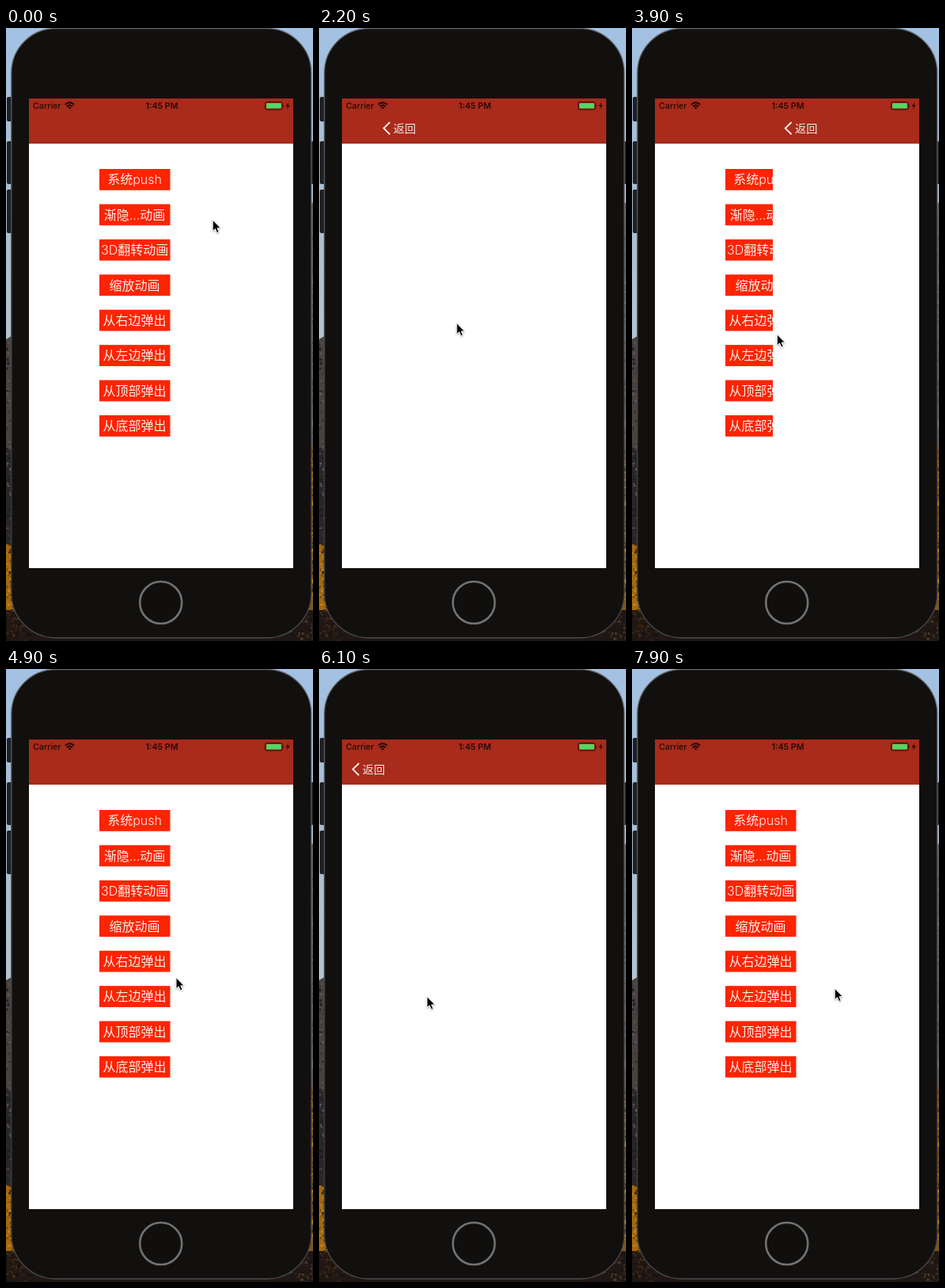
An HTML page that plays this animation: 388x774 px, repeating every 8000 ms.

```html
<!DOCTYPE html>
<html lang="zh-CN">
<head>
<meta charset="utf-8">
<title>转场动画</title>
<style>
  html, body { margin: 0; width: 100%; height: 100%; overflow: hidden; background: #131313; }
  svg { display: block; width: 388px; height: 774px; }
  text { font-family: Inter, "Noto Sans CJK SC", "Noto Sans CJK", sans-serif; }
  .label { font-size: 16px; font-weight: 300; fill: #fff; fill-opacity: .92; text-anchor: middle; }
  .status { font-size: 10.7px; font-weight: 600; fill: #260a07; }
  #cursor { filter: drop-shadow(0 1px 1px rgba(0, 0, 0, .3)); }
</style>
</head>
<body>
<svg viewBox="0 0 388 774">
  <defs>
    <linearGradient id="sky" x1="0" y1="0" x2="0" y2="1">
      <stop offset="0" stop-color="#a3c1e3"/>
      <stop offset=".5" stop-color="#a8bdd0"/>
      <stop offset="1" stop-color="#b4c3cd"/>
    </linearGradient>
    <linearGradient id="rim" x1="0" y1="0" x2="0" y2="1">
      <stop offset="0" stop-color="#64676b"/>
      <stop offset=".8" stop-color="#3c3d3f"/>
      <stop offset="1" stop-color="#4b4c4e"/>
    </linearGradient>
    <clipPath id="screen"><rect x="29" y="89" width="334" height="593"/></clipPath>
  </defs>

  <g id="wallpaper">
    <rect width="388" height="400" fill="url(#sky)"/>
    <path d="M0 393L7 389V774H0Z" fill="#48423f"/>
    <path d="M381 226L388 220V774H381Z" fill="#625e60"/>
    <rect y="530" width="8" height="122" fill="#292625"/>
    <rect x="381" y="528" width="7" height="246" fill="#7c561d"/>
    <rect y="652" width="60" height="122" fill="#a2670f"/>
    <rect y="735" width="388" height="39" fill="#1f1713"/>
  </g>

  <g fill="#1e2023">
    <rect x="1" y="87" width="9" height="31" rx="2"/>
    <rect x="1" y="143" width="9" height="54" rx="2"/>
    <rect x="1" y="204" width="9" height="55" rx="2"/>
    <rect x="383" y="143" width="6" height="54" rx="2"/>
  </g>
  <rect x="6.8" y=".5" width="379" height="769.5" rx="56" fill="#12100f" stroke="url(#rim)" stroke-width="1.3"/>
  <circle cx="195.7" cy="725.5" r="26.5" fill="#100f0e" stroke="#727272" stroke-width="2.6"/>

  <g clip-path="url(#screen)">
    <rect x="29" y="89" width="334" height="593" fill="#fff"/>
    <rect x="29" y="89" width="334" height="57" fill="#a82b1b"/>
    <g id="list"></g>
    <g id="page">
      <rect x="29" y="89" width="334" height="593" fill="#fff"/>
      <rect x="29" y="89" width="334" height="57" fill="#a82b1b"/>
      <path d="M52.5 119L44.8 126.6L52.5 134.2" fill="none" stroke="#fff" stroke-opacity=".92" stroke-width="1.9"/>
      <text x="57" y="131.7" font-size="14.2" font-weight="300" fill="#fff" fill-opacity=".88">返回</text>
    </g>
  </g>

  <g id="statusBar">
    <text class="status" x="34" y="102" style="font-weight:500">Carrier</text>
    <text class="status" x="197" y="102" text-anchor="middle">1:45 PM</text>
    <path d="M74.8 96.7Q80.5 91.5 86.2 96.7M76.9 99.2Q80.5 96 84.1 99.2" fill="none" stroke="#260a07" stroke-width="2"/>
    <path d="M78.4 100.6Q80.5 98.9 82.6 100.6L80.5 102.8Z" fill="#260a07"/>
    <rect x="327.7" y="93.5" width="21.5" height="9.4" rx="2" fill="none" stroke="#260a07"/>
    <rect x="329.1" y="94.9" width="18.7" height="6.6" rx=".8" fill="#53d764"/>
    <path d="M350.3 96.6Q352 98.2 350.3 99.8Z" fill="#260a07"/>
    <path d="M357.2 93.5L353.5 98.8H355.9L354.9 102.8L358.7 97.3H356.2Z" fill="#260a07"/>
  </g>

  <path id="cursor" d="M0 0V14.2L3.2 11.2L5.5 16.3L8 15.2L5.8 10.3H10.2Z" fill="#000" stroke="#fff" stroke-width="1"/>
</svg>

<script>
const LOOP = 8000, STEP = 100, SCREEN_WIDTH = 334;
const svgNS = "http://www.w3.org/2000/svg";
const byId = id => document.getElementById(id);

function add(parent, tag, attrs, content = "") {
  const node = document.createElementNS(svgNS, tag);
  for (const key in attrs) node.setAttribute(key, attrs[key]);
  node.textContent = content;
  parent.appendChild(node);
}

const labels = ["系统push", "渐隐…动画", "3D翻转动画", "缩放动画",
  "从右边弹出", "从左边弹出", "从顶部弹出", "从底部弹出"];
labels.forEach((label, i) => {
  const y = 178 + i * 44.43;
  add(byId("list"), "rect", { x: 118, y, width: 89.5, height: 26.8, fill: "#fd2401" });
  add(byId("list"), "text", { x: 162.6, y: y + 19.3, class: "label" }, label);
});

// Rough rock and foliage along the visible edges of the wallpaper.
let seed = 17;
const random = () => (seed = seed * 16807 % 2147483647) / 2147483647;
function speckle(count, x, y, width, height, colors) {
  for (let i = 0; i < count; i++) {
    add(byId("wallpaper"), "rect", {
      x: x + random() * width, y: y + random() * height,
      width: 1 + random() * 3, height: 1 + random() * 3,
      fill: colors[Math.floor(random() * colors.length)]
    });
  }
}
speckle(90, 0, 395, 7, 255, ["#5b5553", "#353130", "#1f1d1d"]);
speckle(60, 384, 225, 4, 300, ["#777477", "#4c494b"]);
speckle(90, 0, 650, 14, 85, ["#d28b13", "#3b2811", "#a96b11"]);
speckle(60, 384, 528, 4, 200, ["#c98916", "#3e2e1b"]);
speckle(70, 0, 735, 32, 38, ["#4a2c14", "#151211", "#2f1f18"]);
speckle(60, 355, 742, 33, 31, ["#4d3b2b", "#1a1513", "#30231d"]);

const ease = u => u * u * (3 - 2 * u);

// Each key is [time, value, ...]; values are eased between neighbours.
function track(keys, time) {
  const next = keys.findIndex(key => key[0] > time);
  if (next < 0) return keys[keys.length - 1].slice(1);
  const a = keys[next - 1], b = keys[next];
  const u = ease((time - a[0]) / (b[0] - a[0]));
  return a.slice(1).map((value, i) => value + (b[i + 1] - value) * u);
}

const cursorKeys = [
  [0, 261.2, 242.4], [200, 261.2, 242.4], [1050, 174.6, 375.6],
  [1700, 174.4, 374], [2200, 174, 372.6], [2400, 174, 372.6],
  [3200, 34.2, 373.6], [3350, 34.2, 373.6], [4100, 215, 389.6],
  [4900, 215, 389.6], [5300, 136.4, 413.6], [6200, 136.4, 413.6],
  [6700, 34.4, 411.6], [6800, 34.4, 411.6], [7400, 256.2, 403.4]
];
const rightPage = [
  [0, 1], [1645, 1], [2345, 0], [3350, 0], [4100, .54], [4350, 1]
];
const leftPage = [
  [0, -1], [5430, -1], [6130, 0], [6800, 0], [7400, -.66], [7650, -1]
];

function draw(now) {
  const time = Math.floor(now % LOOP / STEP) * STEP;
  const [shift] = track(time < 4900 ? rightPage : leftPage, time);
  const [x, y] = track(cursorKeys, time);
  byId("page").setAttribute("transform", `translate(${Math.round(shift * SCREEN_WIDTH)})`);
  byId("cursor").setAttribute("transform", `translate(${x} ${y})`);
}

const start = performance.now();
function tick() {
  draw(performance.now() - start);
  requestAnimationFrame(tick);
}
tick();
</script>
</body>
</html>
```
